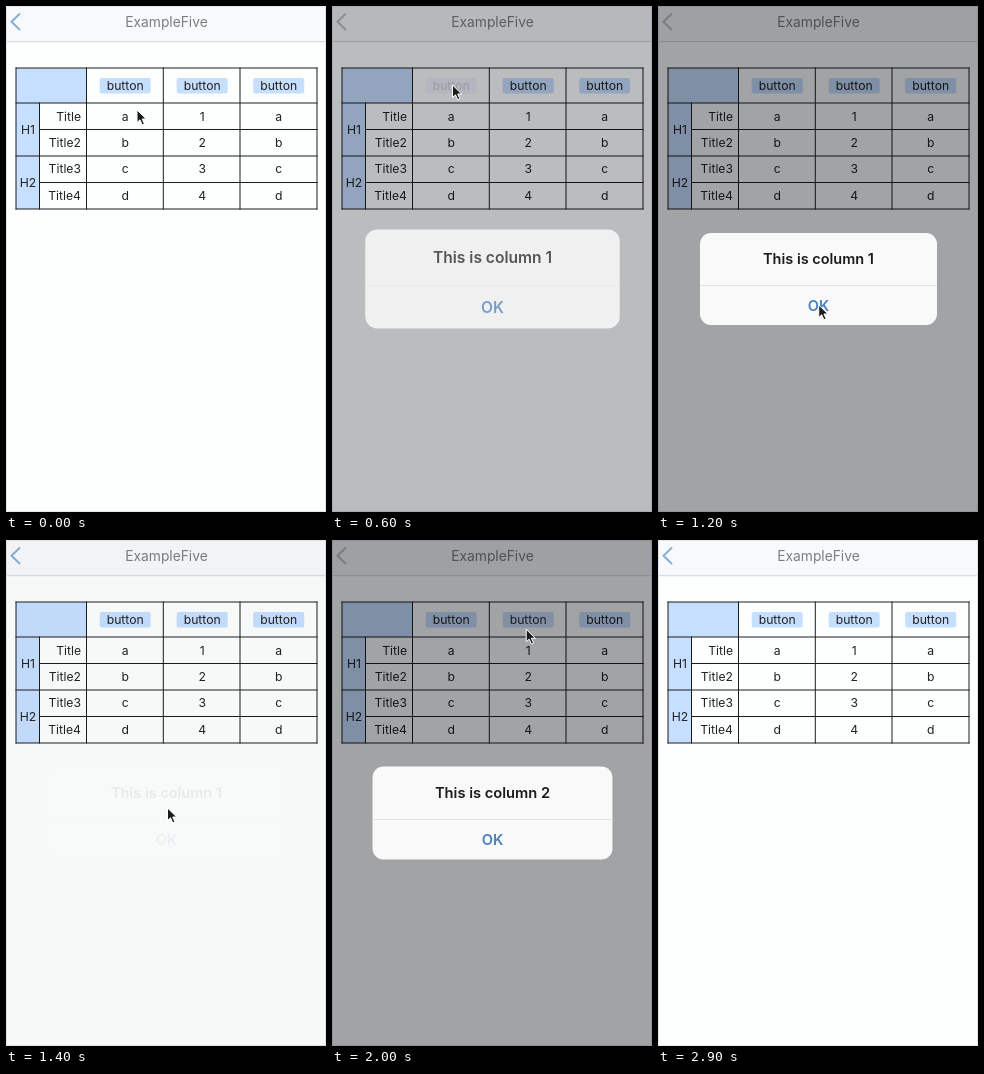
Animation of 320x506 px, one loop 3000 ms. Source, as an HTML page:

```html
<!DOCTYPE html>
<html lang="en">
<head>
<meta charset="utf-8">
<style>
  html, body { margin: 0; width: 100%; height: 100%; overflow: hidden; background: #fdfefe; }
  svg { display: block; width: 320px; height: 506px; font: 12.2px Inter, sans-serif; }
  text { text-anchor: middle; fill: #222; }
  .end { text-anchor: end; }
  .blue { fill: #c7dfff; }
  #title { font-size: 13.8px; fill: #7c7e81; }
  #content text { font-size: 14.5px; font-weight: 600; fill: #1c1c1c; }
  #content .ok { fill: #4a80bc; }
</style>
</head>
<body>
<svg viewBox="0 0 320 506">
  <rect width="320" height="506" fill="#fdfefe"/>
  <rect width="320" height="35.5" fill="#f7f9fb"/>
  <path d="M0 35.7H320" stroke="#c8ccd2" stroke-width=".8"/>
  <path id="back" d="M14 7.5L5.5 15.8L14 24" fill="none" stroke-width="2"/>
  <text id="title" x="160.5" y="21">ExampleFive</text>
  <g id="table"></g>
  <rect x=".5" y=".5" width="319" height="505" fill="none" stroke="#e4e6ea"/>
  <rect id="dim" width="320" height="506" fill="#020008"/>
  <g id="alert">
    <rect id="panel" x="42" y="227" width="237" height="92" rx="11" fill="#f9f9f9"/>
    <g id="content">
      <path d="M42 279.5H279" stroke="#e2e3e5"/>
      <text id="message" x="160.5" y="258"></text>
      <text class="ok" x="160.5" y="305">OK</text>
    </g>
  </g>
  <path id="cursor" d="M0 0V12.5L3 9.8L5.2 14.8L7.4 13.8L5.2 9H9.2Z" fill="#1c1c1c" stroke="#fff"/>
</svg>
<script>
const $ = id => document.getElementById(id);
const clamp = v => Math.min(1, Math.max(0, v));
const LOOP = 3000, STEP = 100;
const columns = [10, 33.5, 80.5, 157.3, 234, 311];
const rows = [62, 97, 123.5, 150, 176.5, 203];
const centers = [119.2, 196.2, 272.7];

const alerts = [
  { column: 0, open: 510, close: 1210 },
  { column: 1, open: 1750, close: 2410 },
];

// time, x, y of the pointer tip
const pointer = [
  [0, 131, 104], [400, 120.5, 79], [800, 120.5, 79], [1100, 160, 299], [1250, 161, 299],
  [1400, 161.5, 268], [1700, 196, 77], [1950, 196, 77], [2300, 163.5, 300], [2800, 163.5, 300],
];

const label = (x, y, s, cls = "") => `<text class="${cls}" x="${x}" y="${y}">${s}</text>`;
const rect = (x, y, w, h, r = 0) => `<rect class="blue" x="${x}" y="${y}" width="${w}" height="${h}" rx="${r}"/>`;

function buildTable() {
  let out = rect(10, 62, 70.5, 35) + rect(10, 97, 23.5, 106);
  let lines = "";
  columns.forEach((x, i) => lines += `M${x} ${i === 1 ? 97 : 62}V203`);
  rows.forEach((y, i) => lines += `M${i === 2 || i === 4 ? 33.5 : 10} ${y}H311`);
  out += `<path d="${lines}" fill="none" stroke="#1c1c1c" stroke-linecap="square"/>`;
  out += label(22, 128, "H1") + label(22, 181, "H2");
  ["Title", "Title2", "Title3", "Title4"].forEach((name, i) => {
    const y = 114.7 + i * 26.35, letter = "abcd"[i];
    out += label(75, y, name, "end");
    [letter, i + 1, letter].forEach((s, c) => out += label(centers[c], y, s));
  });
  centers.forEach((x, i) => out += `<g id="button${i}">${rect(x - 25.5, 72, 51, 15.5, 2)}${label(x, 83.7, "button")}</g>`);
  $("table").innerHTML = out;
}

function pointerAt(t) {
  const i = pointer.findIndex(p => p[0] > t);
  if (i < 0) return pointer.at(-1).slice(1);
  const [a, b] = [pointer[i - 1], pointer[i]];
  const k = (t - a[0]) / (b[0] - a[0]), ease = k * k * (3 - 2 * k);
  return [1, 2].map(n => a[n] + (b[n] - a[n]) * ease);
}

function draw(t) {
  let alpha = 0, scale = 1, active = false;
  for (const { column, open, close } of alerts) {
    const age = t - open;
    $("button" + column).setAttribute("opacity", age < 0 ? 1 : clamp(.2 + Math.max(0, age - 100) / 200));
    if (age < 0 || t > close + 400) continue;
    const settle = 1 - Math.exp(-age / 90);
    scale = 1.2 - .2 * settle;
    alpha = clamp(settle * 1.15) * Math.exp(-Math.max(0, t - close) / 70);
    active = t < close;
    $("message").textContent = `This is column ${column + 1}`;
  }
  $("dim").setAttribute("opacity", .36 * alpha);
  $("panel").setAttribute("opacity", Math.sqrt(alpha));
  $("content").setAttribute("opacity", alpha);
  $("alert").setAttribute("transform", `translate(160.5 273) scale(${scale}) translate(-160.5 -273)`);
  $("back").setAttribute("stroke", active ? "#bfc1c4" : "#86b0d6");
  $("cursor").setAttribute("transform", `translate(${pointerAt(t)})`);
  $("cursor").setAttribute("opacity", t < 2800 ? 1 : 0);
}

function frame() {
  draw(Math.floor(performance.now() % LOOP / STEP) * STEP);
  requestAnimationFrame(frame);
}

buildTable();
frame();
</script>
</body>
</html>
```
